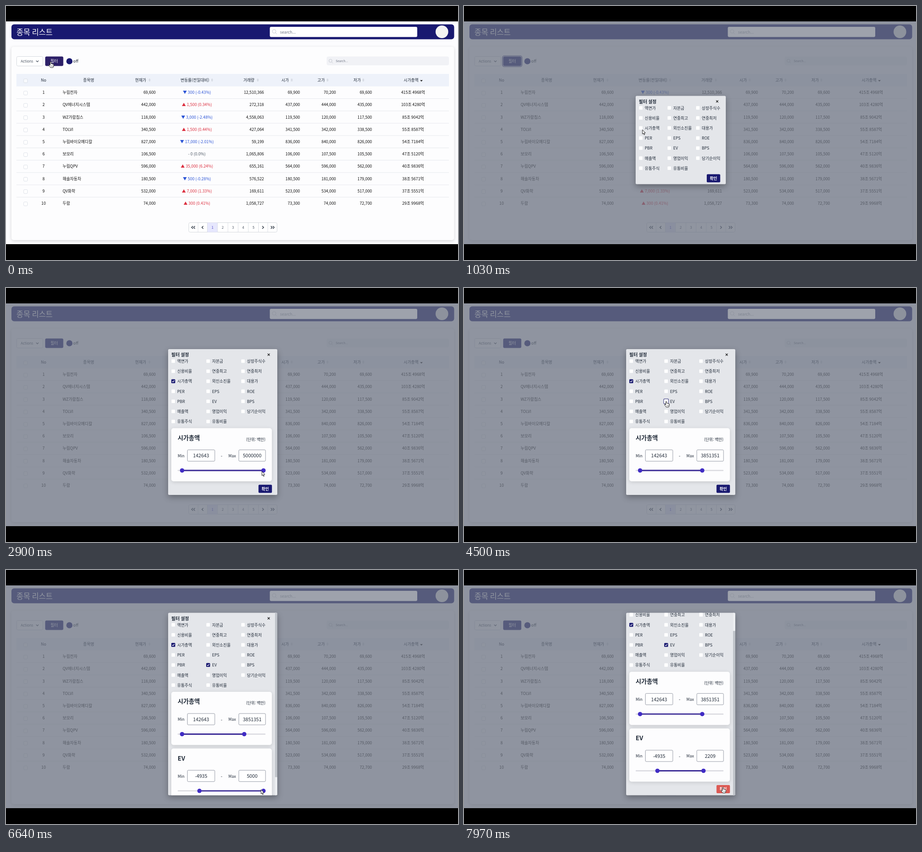
An HTML page with a canvas for the animation above (8000 ms loop, 998 px wide and 561 px high).

```html
<!DOCTYPE html>
<html lang="ko">
<head>
<meta charset="utf-8">
<title>종목 리스트</title>
<style>
  html, body { margin: 0; width: 100%; height: 100%; overflow: hidden; background: #000; }
  canvas { display: block; width: 998px; height: 561px; }
</style>
</head>
<body>
<canvas id="stage" width="998" height="561"></canvas>
<script>
const ctx = document.getElementById('stage').getContext('2d');
const LOOP = 8000;
const FONT = '"Noto Sans CJK KR", "Noto Sans CJK JP", "Noto Sans CJK", "Noto Sans", sans-serif';
const NAVY = '#191970', INK = '#1f2937', BLUE = '#2b54d6', RED = '#dc2f3f';

// Times of the interactions, in ms
const OPEN = 200, CHECK_CAP = 1250, FOCUS_EV = 4420, CHECK_EV = 4540, HOVER_OK = 7660;

const ROWS = [
  ['누림전자', '69,600', '▼ 300 (-0.43%)', '12,510,366', '69,900', '70,200', '69,600', '415조 4968억'],
  ['QV에너지시스템', '442,000', '▲ 1,500 (0.34%)', '272,318', '437,000', '444,000', '435,000', '103조 4280억'],
  ['WZ가람칩스', '118,000', '▼ 3,000 (-2.48%)', '4,558,063', '119,500', '120,000', '117,500', '85조 9042억'],
  ['TOLVI', '340,500', '▲ 1,500 (0.44%)', '427,064', '341,500', '342,000', '338,500', '55조 8587억'],
  ['누림바이오메디칼', '827,000', '▼ 17,000 (-2.01%)', '59,199', '836,000', '840,000', '826,000', '54조 7184억'],
  ['보모리', '106,500', '- 0 (0.0%)', '1,065,806', '106,000', '107,500', '105,500', '47조 5120억'],
  ['누림QPV', '596,000', '▲ 35,000 (6.24%)', '655,161', '564,000', '596,000', '562,000', '40조 9836억'],
  ['해솔자동차', '180,500', '▼ 500 (-0.28%)', '576,522', '180,500', '181,000', '179,000', '38조 5671억'],
  ['QV화학', '532,000', '▲ 7,000 (1.33%)', '169,611', '523,000', '534,000', '517,000', '37조 5551억'],
  ['두람', '74,000', '▲ 300 (0.41%)', '1,058,727', '73,300', '74,000', '72,700', '29조 9968억']
];
// Header label, left edge, sort icon position
const HEADS = [['현재가', 285, 317], ['변동률(전일대비)', 385.5, 455], ['거래량', 524, 556],
  ['시가', 608, 631], ['고가', 687.5, 710], ['저가', 767, 789]];
// Cell position and alignment, in the order of the row fields
const CELLS = [[125, 'left'], [330.5, 'right'], [421.5, 'center'], [569.5, 'right'],
  [649, 'right'], [728.5, 'right'], [808, 'right'], [898.8, 'center']];
const FILTERS = ['액면가', '자본금', '상장주식수', '신용비율', '연중최고', '연중최저', '시가총액', '외인소진율',
  '대용가', 'PER', 'EPS', 'ROE', 'PBR', 'EV', 'BPS', '매출액', '영업이익', '당기순이익', '유통주식', '유통비율'];

const POINTER = [
  [0, 98.5, 123], [300, 98.5, 123], [1030, 394, 273.5], [1150, 391, 270], [1380, 391, 270],
  [1750, 383, 402], [1850, 383, 402], [2200, 388.5, 403], [2350, 388.5, 403], [2820, 565, 405],
  [2960, 565, 405], [3550, 522, 405], [3750, 522, 405], [4350, 446.5, 250], [4700, 446.5, 250],
  [5150, 384, 486], [5787.74, 428, 486], [5950, 428, 486], [6560, 563, 485], [6700, 563, 485],
  [7150, 524, 485], [7350, 524, 485], [7750, 571.5, 479.5]
];
const CAP_MIN = [[1850, 0], [2200, 142643]];
const CAP_MAX = [[2960, 5000000], [3550, 3851351]];
const EV_MIN = [[5150, -8000], [5787.74, -4935]];
const EV_MAX = [[6700, 5000], [7150, 2209]];
const SCROLL = [[7330, 0], [7540, 44.3]];

// Eased value of column `col` in a list of [time, ...values]
function at(keys, t, col = 1) {
  const i = keys.findIndex(k => k[0] > t);
  if (i === 0) return keys[0][col];
  if (i < 0) return keys[keys.length - 1][col];
  const a = keys[i - 1], b = keys[i], u = (t - a[0]) / (b[0] - a[0]);
  return a[col] + (b[col] - a[col]) * u * u * (3 - 2 * u);
}

function text(s, x, y, { size = 8.9, color = INK, align = 'left', weight = 400 } = {}) {
  ctx.font = `${weight} ${size}px ${FONT}`;
  ctx.fillStyle = color;
  ctx.textAlign = align;
  ctx.fillText(s, x, y + size * 0.36);
}

// Rounded box between two corners
function box(x0, y0, x1, y1, r, fill, stroke, width = 1) {
  ctx.beginPath();
  ctx.roundRect(x0, y0, x1 - x0, y1 - y0, r);
  if (fill) { ctx.fillStyle = fill; ctx.fill(); }
  if (stroke) { ctx.strokeStyle = stroke; ctx.lineWidth = width; ctx.stroke(); }
}

function shadowBox(blur, dy, alpha, ...args) {
  ctx.save();
  ctx.shadowColor = `rgba(0,0,0,${alpha})`;
  ctx.shadowBlur = blur;
  ctx.shadowOffsetY = dy;
  box(...args);
  ctx.restore();
}

function line(points, color, width = 1) {
  ctx.beginPath();
  points.forEach(([x, y]) => ctx.lineTo(x, y));
  ctx.strokeStyle = color;
  ctx.lineWidth = width;
  ctx.stroke();
}

function poly(points, fill, stroke) {
  ctx.beginPath();
  points.forEach(([x, y]) => ctx.lineTo(x, y));
  ctx.closePath();
  ctx.fillStyle = fill;
  ctx.fill();
  if (stroke) { ctx.strokeStyle = stroke; ctx.lineWidth = 1; ctx.stroke(); }
}

function disc(x, y, r, fill) {
  ctx.beginPath();
  ctx.arc(x, y, r, 0, Math.PI * 2);
  ctx.fillStyle = fill;
  ctx.fill();
}

function magnifier(x, y, r, color) {
  ctx.beginPath();
  ctx.arc(x - 1, y - 1, r, 0, Math.PI * 2);
  ctx.strokeStyle = color;
  ctx.lineWidth = 0.9;
  ctx.stroke();
  line([[x - 1 + r * 0.7, y - 1 + r * 0.7], [x + r + 1, y + r + 1]], color, 0.9);
}

function drawToolbar(t) {
  box(12, 40.5, 989.5, 73.5, 6, NAVY);
  text('종목 리스트', 23, 58, { size: 16.6, color: '#fff' });
  box(582.5, 46, 908, 68.5, 3, '#fff');
  magnifier(593, 57, 4, '#c3c7ce');
  text('search...', 605, 57.5, { color: '#6b7280' });
  disc(962.5, 57, 14, '#f4f4f2');

  shadowBox(7, 2, 0.16, 12, 90, 989.5, 517, 5, '#fdfdfe');
  box(23.5, 111.5, 81.5, 132.5, 3, '#fff', '#d1d5db', 0.9);
  text('Actions', 32.5, 122, { size: 8, color: '#4b5563' });
  line([[66.5, 120.7], [69.2, 123.4], [71.9, 120.7]], '#374151', 1.2);
  if (t >= OPEN && t < CHECK_CAP) box(85, 110, 128, 134, 4, '#fff', NAVY, 1.2);
  box(86.5, 111.5, 126.5, 132.5, 3, t < OPEN ? '#2d2068' : NAVY);
  text('필터', 106.5, 122, { color: '#fff', align: 'center' });
  disc(140, 122, 6.8, NAVY);
  text('off', 148.5, 122);
  box(708, 111.5, 978, 131, 4, '#f1f2f6');
  magnifier(717.5, 122, 3.4, '#c3c7ce');
  text('Search...', 728, 122, { size: 6.7, color: '#6b7280' });
}

function drawTable() {
  box(23, 150, 978, 177.5, 0, '#eef2fa');
  box(39, 161, 47.5, 169.5, 2, '#f8fafd', '#d5dae2', 0.8);
  text('No', 83, 164, { align: 'center' });
  text('종목명', 182.5, 164, { align: 'center' });
  for (const [label, x, icon] of HEADS) {
    text(label, x, 164);
    poly([[icon - 2.3, 162.8], [icon, 160.5], [icon + 2.3, 162.8]], '#c4c9d2');
    poly([[icon - 2.3, 164.2], [icon, 166.5], [icon + 2.3, 164.2]], '#c4c9d2');
  }
  text('시가총액', 878, 164);
  poly([[914.3, 163.8], [917.2, 166.8], [920.1, 163.8]], '#111');

  ROWS.forEach((row, i) => {
    const y = 191 + 27.2 * i;
    if (i < 9) line([[23, y + 13.6], [978, y + 13.6]], '#e5e7eb', 0.9);
    box(39, y - 3, 47.5, y + 5.5, 2, '#fff', '#d5dae2', 0.8);
    text(i + 1, 83, y, { align: 'center', color: '#111' });
    row.forEach((cell, c) => {
      const [x, align] = CELLS[c];
      const color = cell[0] === '▼' ? BLUE : cell[0] === '▲' ? RED : c === 2 ? '#4b5563' : '#111';
      text(cell, x, y, { align, color });
    });
  });
}

function drawPager() {
  const edges = [403.5, 424, 444.5, 467, 490, 512.5, 535, 557.5, 578, 598.5];
  box(403.5, 478.5, 598.5, 499.5, 3, '#fff', '#d1d5db', 0.9);
  box(444.5, 478.5, 467, 499.5, 0, '#e6e7fd');
  edges.slice(1, -1).forEach(x => line([[x, 478.5], [x, 499.5]], '#d9dce2', 0.9));
  for (let n = 1; n <= 5; n++)
    text(n, 433.3 + 22.6 * n, 489.3, { size: 7.8, align: 'center', color: n === 1 ? '#4f46c5' : '#4b5563' });
  const chevron = (x, d) => line([[x - d, 486], [x + d * 1.6, 489], [x - d, 492]], '#1f2937', 1.3);
  [[411.7, -1.2], [416, -1.2], [434.4, -1.2], [567, 1.2], [586, 1.2], [590.3, 1.2]].forEach(c => chevron(...c));
}

function checkbox(x, y, checked, ring) {
  if (ring) box(x - 1.2, y - 5.5, x + 9.8, y + 5.5, 2.5, '#fff', '#4a4a8c', 1.2);
  box(x, y - 4.3, x + 8.6, y + 4.3, 1.5, checked ? NAVY : '#fff', checked ? null : '#dcdfe5', 0.6);
  if (checked) line([[x + 2, y + 0.1], [x + 3.7, y + 1.8], [x + 6.7, y - 1.7]], '#fff', 1.2);
}

function rangeCard(y, title, unit, low, high, from, to) {
  const pos = v => 383.5 + 185 * (v - from) / (to - from);
  shadowBox(8, 2, 0.13, 365, y, 587, y + 117.5, 5, '#fdfdfe');
  text(title, 379, y + 21.5, { size: 13.35, weight: 600 });
  text(unit, 573, y + 25, { align: 'right' });
  text('Min', 379, y + 61);
  text('-', 476, y + 61, { align: 'center', size: 10 });
  text('Max', 491, y + 61);
  [[400.5, 461, low], [514, 573, high]].forEach(([x0, x1, v]) => {
    box(x0, y + 48, x1, y + 73, 2, '#fff', '#7b8290', 0.8);
    text(Math.round(v), (x0 + x1) / 2, y + 61, { size: 10.6, align: 'center' });
  });
  box(379, y + 92.3, 573, y + 94.7, 1.2, '#d9d9df');
  box(pos(low), y + 92.1, pos(high), y + 94.9, 0, '#3a2a96');
  disc(pos(low), y + 93.5, 4.8, '#402cc4');
  disc(pos(high), y + 93.5, 4.8, '#402cc4');
}

function drawModal(t) {
  const small = t < CHECK_CAP, tall = t >= CHECK_EV;
  const [left, top, right, bottom] = small ? [379, 198.5, 578, 393.5]
    : tall ? [358, 94.5, 599, 497.5] : [358, 135, 599, 457];
  const scroll = at(SCROLL, t), y0 = top - scroll, pitch = small ? 63 : 77;

  shadowBox(14, 5, 0.3, left, top, right, bottom, 2.5, '#e4e6ea');
  ctx.save();
  ctx.beginPath();
  ctx.roundRect(left, top, right - left, bottom - top, 2.5);
  ctx.clip();

  text('필터 설정', left + 7, y0 + 12.5, { size: 10, weight: 700 });
  const cx = small ? 559 : 580, cy = y0 + 12.2;
  line([[cx - 2.4, cy - 2.4], [cx + 2.4, cy + 2.4]], '#111', 1.2);
  line([[cx + 2.4, cy - 2.4], [cx - 2.4, cy + 2.4]], '#111', 1.2);

  FILTERS.forEach((name, i) => {
    const x = left + 7 + pitch * (i % 3), y = y0 + 26.8 + 22.2 * Math.floor(i / 3);
    const checked = (name === '시가총액' && !small) || (name === 'EV' && tall);
    checkbox(x, y - 0.3, checked, name === 'EV' && t >= FOCUS_EV && !tall);
    text(name, x + 13, y);
  });

  if (!small) rangeCard(y0 + 174.5, '시가총액', '(단위: 백만)', at(CAP_MIN, t), at(CAP_MAX, t), 0, 5e6);
  if (tall) rangeCard(y0 + 299.8, 'EV', '', at(EV_MIN, t), at(EV_MAX, t), -8000, 5000);

  const bx = small ? 536 : 557.5, by = y0 + (small ? 173 : tall ? 424.8 : 299.5);
  const hover = t >= HOVER_OK;
  box(bx, by, bx + 29.7, by + 18, 2, hover ? '#dc5a54' : NAVY);
  text('확인', bx + 14.8, by + 9.2, { color: '#fff', align: 'center', weight: 700 });

  if (tall) {
    box(594, top, 599, bottom, 0, '#eceef1');
    const sy = top + scroll * 403 / 447;
    box(594, sy, 599, sy + 363, 0, '#bfc3ca');
  }
  ctx.restore();
}

function drawPointer(t) {
  const hand = t < 340 || (t > 1110 && t < 1400) || (t > 4320 && t < 4720) || t >= HOVER_OK;
  ctx.save();
  ctx.translate(at(POINTER, t), at(POINTER, t, 2));
  ctx.lineJoin = 'round';
  if (hand) {
    poly([[-1, 0.8], [0, 0], [1, 0.8], [1.2, 4.6], [3, 4.5], [3.4, 5.2], [5, 5], [5.4, 5.8], [6.6, 5.9],
      [7, 7], [6.6, 10], [5.4, 13], [-0.2, 13], [-2, 10.4], [-4, 7.6], [-3.2, 6.7], [-1, 8]], '#fff', '#222');
    [1.4, 3.3, 5.2].forEach(x => line([[x, 8.2], [x, 11]], '#444', 0.6));
  } else {
    poly([[0, 0], [0, 9.4], [2.1, 7.5], [3.6, 11], [5.1, 10.4], [3.7, 7], [6.6, 6.8]], '#fff', '#222');
  }
  ctx.restore();
}

function draw(t) {
  ctx.fillStyle = '#fcfcfe';
  ctx.fillRect(0, 0, 998, 561);
  drawToolbar(t);
  drawTable();
  drawPager();
  if (t >= OPEN) {
    const u = Math.min(1, (t - OPEN) / 250);
    ctx.globalAlpha = 1 - (1 - u) * (1 - u);
    ctx.fillStyle = 'rgba(107,114,128,0.75)';
    ctx.fillRect(0, 0, 998, 561);
    box(582.5, 46, 908, 68.5, 3, 'rgba(255,255,255,0.12)');
    drawModal(t);
    ctx.globalAlpha = 1;
  }
  ctx.fillStyle = '#000';
  ctx.fillRect(0, 0, 998, 34);
  ctx.fillRect(0, 526, 998, 35);
  drawPointer(t);
}

const start = performance.now();
function tick() {
  draw((performance.now() - start) % LOOP);
  requestAnimationFrame(tick);
}
tick();
</script>
</body>
</html>
```
